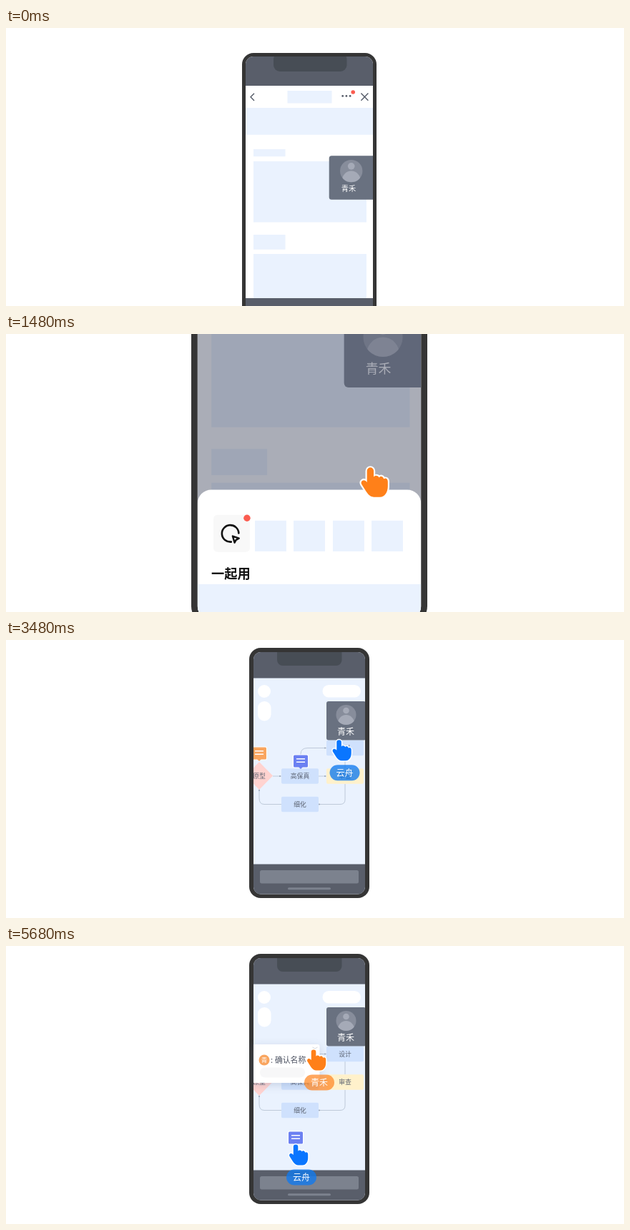
Animation of 864 by 390 pixels, one loop 6 s. Source, as an HTML page with a canvas:

```html
<!DOCTYPE html>
<html lang="zh-CN">
<head>
<meta charset="utf-8">
<style>
html, body { margin: 0; width: 100%; height: 100%; overflow: hidden; background: #fff; }
canvas { display: block; }
</style>
</head>
<body>
<canvas width="864" height="390"></canvas>
<script>
const ctx = document.querySelector('canvas').getContext('2d');
const LOOP = 6000, MID = 424;
const PALE = '#eaf2fe', BAR = '#595e6a', NOTCH = '#474d55', TILE = '#697180', BODY = '#353535';
const RED = '#fb5c50', ORANGE = '#ff8019', BLUE = '#0a76ff', PEACH = '#f9a55f', VIOLET = '#6b80f2';
const CALLER = '青禾', GUEST = '云舟';
const HAND = new Path2D('M-11-17A5 5 0 0 1-1-17V-8C1-11 6-10 7-7C9-10 13-9 14-5C17-7 20-5 20-1V6' +
  'C20 14 16 22 8 22H-1C-7 22-11 16-14 11L-19 3C-21-1-17-5-13-2L-11 0Z');

const clamp = v => Math.max(0, Math.min(1, v));
const prog = (t, a, b) => clamp((t - a) / (b - a));
const cubic = p => p < .5 ? 4 * p ** 3 : 1 - 4 * (1 - p) ** 3;
const quad = p => p < .5 ? 2 * p * p : 1 - 2 * (1 - p) ** 2;
const mix = (a, b, p) => a + (b - a) * p;

function box(x, y, w, h, fill, r = 0) {
  ctx.fillStyle = fill;
  ctx.beginPath();
  ctx.roundRect(x, y, w, h, r);
  ctx.fill();
}
function disc(x, y, r, fill) {
  ctx.fillStyle = fill;
  ctx.beginPath();
  ctx.arc(x, y, r, 0, 7);
  ctx.fill();
}
function line(d, color, width) {
  ctx.strokeStyle = color;
  ctx.lineWidth = width;
  ctx.stroke(new Path2D(d));
}
function text(s, x, y, size, color, weight = 400, align = 'center') {
  ctx.font = `${weight} ${size}px "Noto Sans CJK SC", "Noto Sans CJK", sans-serif`;
  ctx.textAlign = align;
  ctx.textBaseline = 'middle';
  ctx.fillStyle = color;
  ctx.fillText(s, x, y);
}
// Runs a drawing with its own opacity and state.
function layer(alpha, draw) {
  if (alpha <= 0) return;
  ctx.save();
  ctx.globalAlpha *= alpha;
  draw();
  ctx.restore();
}
function avatar(x, y, r) {
  layer(1, () => {
    disc(x, y, r, '#878d9b');
    ctx.clip();
    disc(x, y - .43 * r, .31 * r, '#a5aab7');
    ctx.beginPath();
    ctx.ellipse(x, y + .9 * r, .84 * r, .9 * r, 0, 0, 7);
    ctx.fill();
  });
}
function hand(x, y, scale, color) {
  layer(1, () => {
    ctx.translate(x, y);
    ctx.scale(scale, scale);
    ctx.lineJoin = 'round';
    ctx.lineWidth = 4.5;
    ctx.strokeStyle = '#fff';
    ctx.stroke(HAND);
    ctx.fillStyle = color;
    ctx.fill(HAND);
  });
}
function cursor(x, y, name, color, tint) {
  box(x - 17, y + 20.5, 42, 22, tint, 11);
  text(name, x + 4, y + 31.5, 12, '#fff');
  hand(x, y, .66, color);
}
function marker(x, y, color) {
  box(x - 11, y - 9.5, 22, 19, '#fff', 2);
  box(x - 10, y - 8.5, 20, 17, color, 1.5);
  ctx.beginPath();
  ctx.moveTo(x - 3, y + 8);
  ctx.lineTo(x, y + 11);
  ctx.lineTo(x + 3, y + 8);
  ctx.fill();
  box(x - 6, y - 4, 12, 1.5, '#fff');
  box(x - 6, y + .5, 12, 1.5, '#fff');
}
function ripple(x, y, p, color) {
  if (p > 0 && p < 1) layer(.55 * (1 - p * p), () => disc(x, y, 4 + 11 * p, color));
}

function sheet() {
  box(5, 287.5, 178, 104, '#fff', [11, 11, 0, 0]);
  box(5, 363, 178, 29, PALE);
  box(17.7, 307.7, 29, 29.5, '#f8f8f8', 3);
  for (const x of [50.7, 81.5, 112.8, 143.6]) box(x, 312.2, 25, 24.6, PALE);
  ctx.lineJoin = ctx.lineCap = 'round';
  line('M31.8 329.2A6.7 6.7 0 1 1 37.8 322.2', '#111', 1.5);
  line('M33 324.6L38 326.4L35.7 327.6L34.5 329.8Z', '#111', 1.4);
  disc(44.4, 310.2, 2.7, RED);
  text('一起用', 16, 354.5, 10.4, '#111', 700, 'left');
}

function callPage(t, scale, top) {
  layer(1, () => {
    ctx.translate(MID - 94 * scale, top);
    ctx.scale(scale, scale);
    box(0, 0, 188, 396.5, BODY, 16);
    box(5, 5, 178, 386.5, '#fff', 11);
    ctx.clip();
    box(5, 5, 178, 41, BAR);
    box(44, 0, 102.5, 26, NOTCH, 9);
    box(63.5, 53, 62, 17.6, PALE);
    line('M17 56.7L12 61.8L17 67', '#555b68', 1.4);
    line('M166.4 56.6L176.4 66.8M176.4 56.6L166.4 66.8', '#555b68', 1.4);
    for (const x of [140.7, 145.9, 151.1]) disc(x, 60.4, 1.4, '#555b68');
    disc(155.2, 55, 2.8, RED);
    box(5, 77, 178, 37.8, PALE);
    box(16, 135, 44.5, 10.3, PALE);
    box(16, 152, 158, 85.6, PALE);
    box(16, 255, 44.5, 20.8, PALE);
    box(16, 282, 158, 62, PALE);
    box(5, 344, 178, 48, BAR);
    box(121.7, 144.2, 62, 61.6, TILE, [3.5, 0, 0, 3.5]);
    avatar(152.7, 165.6, 15.7);
    text(CALLER, 149, 190.5, 10.2, '#fff');
    layer(prog(t, 720, 900), () => box(5, 5, 178, 387, 'rgba(88,94,114,.51)'));
    ctx.translate(0, 110 * (1 - quad(prog(t, 720, 960))));
    if (t > 720) sheet();
  });
}

function node(label, x, y, fill = '#cfe1fd') {
  box(x, y, 52, 21.5, fill, 2);
  text(label, x + 26, y + 10.7, 8.8, '#5b6270', 500);
}
function flow() {
  line('M373 191H385M437 191H448M474 162V180M474 202V224Q474 230.5 467 230.5H437' +
    'M385 230.5H361Q354 230.5 354 222V209M412 180V160Q412 151.5 422 151.5H448', '#b3bfd0', .8);
  for (const [x, y] of [[383, 191], [446, 191], [446, 151.5], [438, 230.5], [354, 211]]) disc(x, y, 1, '#9aa6b8');
  node('设计', 448, 140.7);
  node('高保真', 385, 180.2);
  node('审查', 448, 180.2, '#fff1cb');
  node('细化', 385, 219.8);
  ctx.fillStyle = '#ffd3d0';
  ctx.fill(new Path2D('M354 171L373 190.5L354 210L335 190.5Z'));
  text('原型', 354, 191, 8.8, '#5b6270', 500);
  marker(354, 159, PEACH);
  marker(412, 170, VIOLET);
}
function boardPage(scale, top) {
  ctx.translate(MID * (1 - scale), top - 11 * scale);
  ctx.scale(scale, scale);
  box(340, 11, 168, 351, BODY, 16);
  box(346, 17, 156, 339.5, '#eaf2fe', 10);
  ctx.clip();
  box(346, 17, 156, 36.5, BAR);
  box(379, 10, 90.5, 26, NOTCH, 8);
  disc(361, 72, 9, '#fff');
  box(352, 86, 18.5, 27.5, '#fff', 9);
  box(442.5, 63, 53.5, 17.5, '#fff', 8.7);
  flow();
  box(448, 86, 55, 54.5, TILE, 3);
  avatar(475.5, 105, 14);
  text(CALLER, 475, 128, 12, '#fff');
  box(346, 314.5, 156, 42, BAR);
  box(355, 323, 138, 18.5, '#7c828e', 2.5);
  box(394, 347.3, 60, 3, '#7c828e', 1.5);
}
function comment() {
  ctx.shadowColor = 'rgba(90,110,150,.25)';
  ctx.shadowBlur = 12;
  ctx.shadowOffsetY = 3;
  box(346, 138, 92.5, 54, '#fff', [0, 3, 3, 0]);
  ctx.shadowColor = 'transparent';
  disc(361, 160, 7.5, PEACH);
  text(CALLER[0], 361, 160, 8.5, '#fff');
  text(':', 371.5, 159.5, 11, '#4b5160', 500);
  text('确认名称', 376, 160, 10.8, '#4b5160', 400, 'left');
  box(355, 170.5, 63, 14, '#f7f7f8', 7);
  line('M428.5 142L432 144L435.5 142', '#c3c8d0', .7);
}

function draw(t) {
  ctx.setTransform(1, 0, 0, 1, 0, 0);
  ctx.fillStyle = '#fff';
  ctx.fillRect(0, 0, 864, 390);

  const zoomIn = cubic(prog(t, 0, 440)), scroll = quad(prog(t, 800, 1665));
  const zoomOut = cubic(prog(t, 2400, 3450)), board = prog(t, 2400, 2600);
  const scale = mix(1.964, 1, zoomOut), top = mix(-309.5, 11, zoomOut);

  if (board < 1) {
    if (t < 2400) callPage(t, mix(1, 1.7553, zoomIn), mix(35, 33, zoomIn) - 351 * scroll);
    else callPage(t, scale * .8937, top + 351 * scale - 396.5 * scale * .8937);
    const up = quad(prog(t, 470, 720)), down = quad(prog(t, 820, 1180)), side = quad(prog(t, 1575, 2300));
    const x = mix(mix(mix(525, 521, up), 515, down), 328, side);
    const y = mix(mix(mix(213, 164, up), 208, down), 269, side);
    layer(prog(t, 320, 460) * (1 - board), () => hand(x, y, .94, ORANGE));
  }

  layer(board, () => boardPage(scale, top));

  ripple(360, 167, prog(t, 4240, 4600), ORANGE);
  ripple(405, 281, prog(t, 4480, 4840), BLUE);
  layer(prog(t, 4640, 4920), comment);
  layer(prog(t, 4840, 5000), () => marker(405, 269, VIOLET));

  const go = quad(prog(t, 3200, 4040));
  layer(prog(t, 2760, 2940), () =>
    cursor(mix(487, 409, go), mix(115, 293, go), GUEST, BLUE, 'rgba(16,122,240,.78)'));

  const away = quad(prog(t, 4520, 4900)), back = quad(prog(t, 5380, 5680));
  layer(prog(t, 3700, 3960), () =>
    cursor(mix(mix(363, 466, away), 434, back), mix(mix(177, 199, away), 160, back),
      CALLER, ORANGE, 'rgba(255,138,40,.75)'));
}

function tick() {
  draw(performance.now() % LOOP);
  requestAnimationFrame(tick);
}
tick();
</script>
</body>
</html>
```
